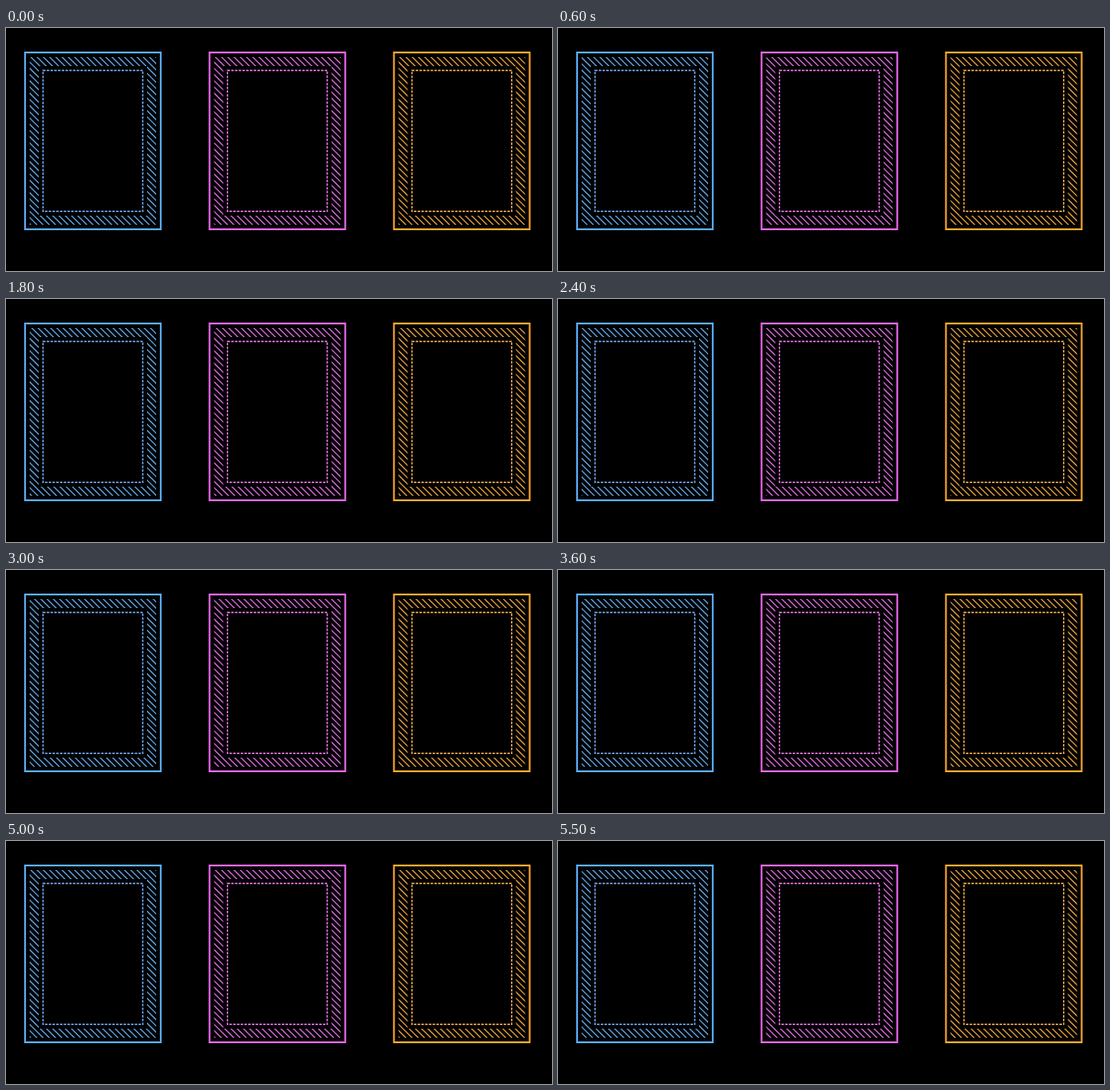
An HTML page with a canvas that plays this animation: 600x268 px, repeating every 5600 ms.

```html
<!DOCTYPE html>
<html lang="en">
<head>
<meta charset="utf-8">
<title>Hatched frames</title>
<style>
  html, body { margin: 0; width: 100%; height: 100%; overflow: hidden; background: #000; }
  canvas { display: block; width: 600px; height: 268px; }
</style>
</head>
<body>
<canvas id="stage" width="600" height="268"></canvas>
<script>
const ctx = document.getElementById("stage").getContext("2d");
const LOOP = 5600, STEP = 100;
const W = 151, H = 197, TOP = 26;
const PITCH = 6.86;          // horizontal distance between hatch lines
const SPEED = 1.2 * PITCH;   // pixels per second
const START = 1.3;
const frames = [
  { x: 20, line: "#5aacfa", hatch: "#66b0f2", dash: "#74acfa" },
  { x: 222.7, line: "#f068f2", hatch: "#e672e8", dash: "#f27af2" },
  { x: 425.4, line: "#ffa930", hatch: "#f2a840", dash: "#ffb050" }
];

function insetRect(d) {
  ctx.rect(d, d, W - 2 * d, H - 2 * d);
}

function strokeRect(d, color, width, dashes) {
  ctx.strokeStyle = color;
  ctx.lineWidth = width;
  ctx.setLineDash(dashes);
  ctx.beginPath();
  insetRect(d);
  ctx.stroke();
}

function drawHatch(color, shift) {
  ctx.save();
  ctx.beginPath();
  insetRect(6);
  insetRect(16);
  ctx.clip("evenodd");
  ctx.beginPath();
  for (let x = shift % PITCH - 30 * PITCH; x < W; x += PITCH) {
    ctx.moveTo(x, 0);
    ctx.lineTo(x + H, H);
  }
  ctx.strokeStyle = color;
  ctx.lineWidth = 1.15;
  ctx.setLineDash([]);
  ctx.stroke();
  ctx.restore();
}

function drawFrame(f, shift) {
  ctx.save();
  ctx.translate(f.x, TOP);
  drawHatch(f.hatch, shift);
  strokeRect(20.7, f.dash, 1.4, [2.74, 1.37]);
  strokeRect(0.95, f.line, 1.9, []);
  ctx.restore();
}

function render() {
  const t = Math.floor((performance.now() % LOOP) / STEP) * STEP;
  const shift = START + SPEED * t / 1000;
  ctx.fillStyle = "#000";
  ctx.fillRect(0, 0, 600, 268);
  frames.forEach(f => drawFrame(f, shift));
  requestAnimationFrame(render);
}
render();
</script>
</body>
</html>
```
